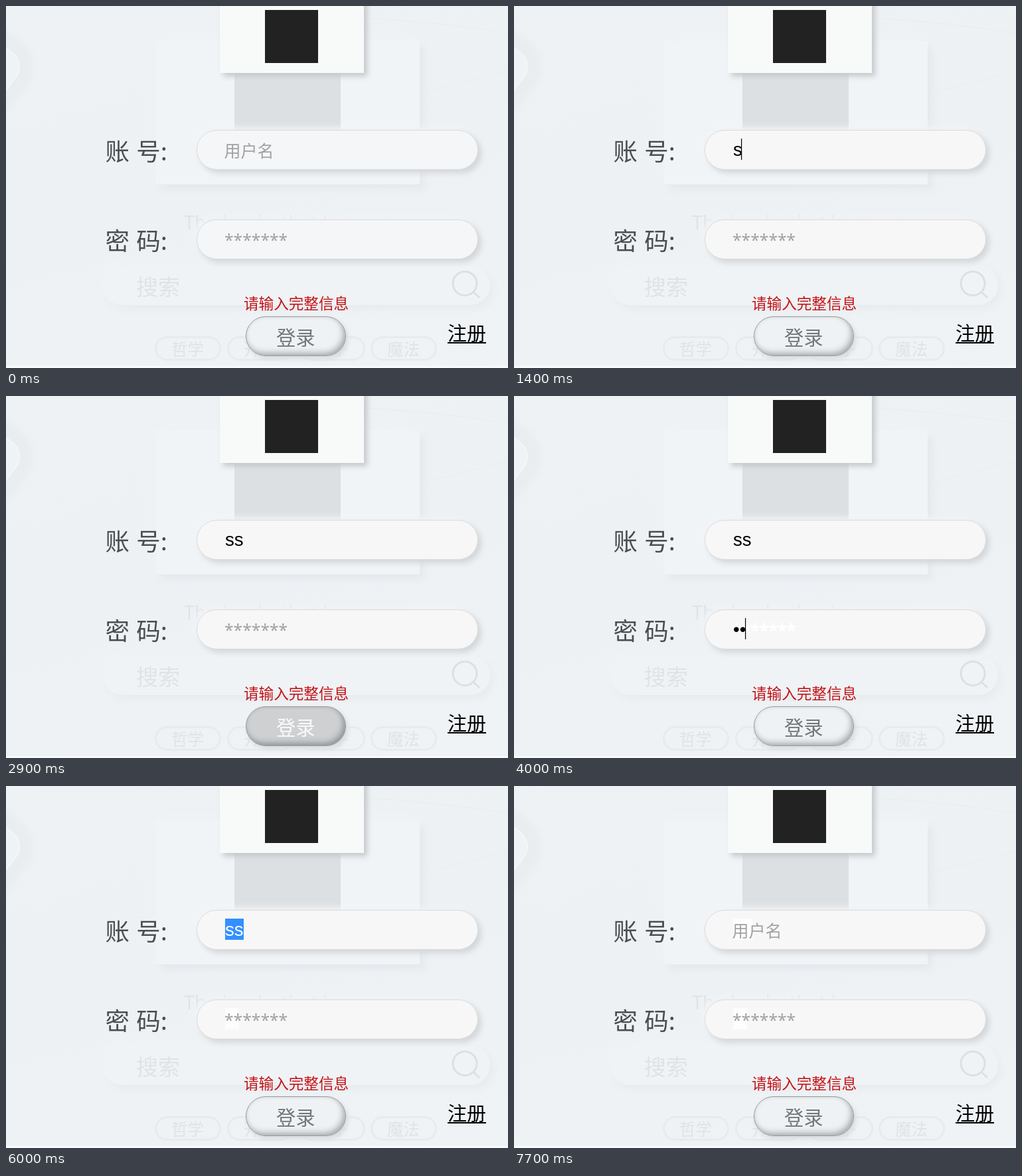
Animation, 756 px wide and 546 px high, one loop 8000 ms. Source, as an HTML page:

```html
<!DOCTYPE html>
<html lang="zh-CN">
<head>
<meta charset="utf-8">
<title>登录</title>
<style>
  html, body { margin: 0; width: 100%; height: 100%; overflow: hidden; background: #eef2f5; }
  #stage { position: relative; width: 756px; height: 546px; overflow: hidden;
    background: linear-gradient(165deg, #eef2f4 0%, #edf1f4 45%, #f0f3f6 100%); }
  #stage div, #stage svg { position: absolute; box-sizing: border-box; }
  svg { left: 0; top: 0; overflow: hidden; }
  text { font-family: "Noto Sans CJK SC", "Noto Sans CJK", sans-serif; white-space: pre; }
  .star { font: 24.7px "Noto Sans", sans-serif; }
  .typed { font: 27.6px "Liberation Sans", sans-serif; }
  .bgcard { left: 226px; top: 53px; width: 397px; height: 216px; background: #f1f4f6;
    box-shadow: 7px 8px 11px #e5e9ec, -4px -4px 10px #f0f3f5; }
  .search { left: 145px; top: 391px; width: 584px; height: 60px; border-radius: 30px;
    background: #f0f3f5; box-shadow: 5px 6px 12px #e7ebee, -4px -4px 9px #f0f3f5; }
  .tag { top: 498px; width: 100px; height: 37px; border: 3px solid #e7ebee; border-radius: 19px; }
  .corner { left: -112px; top: 37px; width: 120px; height: 120px; border-radius: 28px;
    transform: rotate(38deg); background: #eff3f5; border: 2px solid #f4f6f8;
    box-shadow: 0 0 9px 20px #e9edf0; }
  .logo { left: 322px; top: -20px; width: 217px; height: 121px; background: #f8f9f9;
    box-shadow: 5px 5px 8px #c6c9cb; }
  .field { left: 287px; width: 424px; height: 60px; border-radius: 30px; border: 1px solid #dcdcdd;
    box-shadow: 5px 5px 8px #d3d6d9, -4px -4px 9px #f2f4f6; }
  #button { left: 361px; top: 468px; width: 151px; height: 60px; border-radius: 30px;
    border: 1px solid #97999b;
    box-shadow: inset 0 0 6px rgba(0, 0, 0, .08), inset -4px -5px 10px -1px rgba(0, 0, 0, .27),
      3px 4px 7px #d8dbde; }
  #drop { left: 287px; top: 246px; width: 425px; height: 111px; border-radius: 5px;
    background: #292a2d; box-shadow: 0 1px 4px rgba(0, 0, 0, .45); }
  #drop text { font: 16.5px "Open Sans", "Noto Sans CJK SC", "Noto Sans CJK", sans-serif; fill: #fff; }
</style>
</head>
<body>
<div id="stage">
  <div class="corner"></div>
  <div class="bgcard"></div>
  <div class="search"></div>
  <div class="tag" style="left:224px"></div>
  <div class="tag" style="left:333px"></div>
  <div class="tag" style="left:441px"></div>
  <div class="tag" style="left:549px"></div>
  <svg width="756" height="546" fill="#dfe3e6">
    <path d="M539 18Q650 24 756 41M623 132L756 98" fill="none" stroke="#e9edf0"/>
    <rect x="344" y="80" width="160" height="160" fill="#dde0e3"/>
    <text x="268" y="337" font-size="29" style="font-family:'Open Sans',sans-serif">The books that know you</text>
    <text x="196" y="436" font-size="33">搜索</text>
    <g fill="none" stroke="#dce0e3" stroke-width="3">
      <circle cx="691" cy="418.5" r="18"/>
      <path d="M703.5 431L713 440"/>
    </g>
    <g font-size="24.5">
      <text x="249" y="527">哲学</text>
      <text x="358" y="527">开发</text>
      <text x="466" y="527">亲子</text>
      <text x="574" y="527">魔法</text>
    </g>
    <rect y="543" width="756" height="3" fill="#f9fafb"/>
  </svg>
  <div class="logo"></div>
  <div class="field" style="top:187px"></div>
  <div class="field" style="top:322px"></div>
  <div id="button"></div>
  <svg width="756" height="546">
    <rect x="390" y="6" width="80" height="80" fill="#222"/>
    <g font-size="36.5" fill="#4c4d51" word-spacing="2">
      <text x="149.5" y="233">账 号:</text>
      <text x="149.5" y="368">密 码:</text>
    </g>
    <text x="358" y="456.5" font-size="22.6" fill="#c31216">请输入完整信息</text>
    <text id="label" x="407" y="510.5" font-size="29.3">登录</text>
    <text x="665" y="505" font-size="29">注册</text>
    <rect x="665" y="507" width="58" height="2"/>
    <g id="user">
      <text class="hint" x="328.5" y="228" font-size="25">用户名</text>
    </g>
    <g id="pass">
      <text class="hint star" x="329" y="361.5">*******</text>
    </g>
  </svg>
  <div id="drop">
    <svg width="425" height="111">
      <text x="15" y="38">bedo</text>
      <text x="15" y="83" style="font-size:16px">用户名</text>
    </svg>
  </div>
</div>
<script>
const LOOP = 8000;
const $ = id => document.getElementById(id);
const fields = document.querySelectorAll('.field');

// Step tables: [start ms, value]
const dropSteps = [[0, 0], [600, .55], [700, 1], [1200, .6], [1300, .2], [1400, 0]];
const hoverSteps = [[0, 0], [2400, .3], [2500, .75], [2600, 1], [2800, .99], [2900, .96], [3000, .4], [3100, 0],
  [6900, .3], [7000, .75], [7100, 1], [7500, .8], [7600, .35], [7700, 0]];
const tintSteps = [[0, '#f5f6f8'], [1200, '#f7f7f7']];

// Input states: text, caret x, hint colour, selection, pale patch width
const GREY = '#a0a1a3', WHITE = '#fff';
const userSteps = [
  [0, { hint: GREY }],
  [600, { hint: WHITE, caret: 330 }],
  [1200, { text: 's' }],
  [1400, { text: 's', caret: 342 }],
  [1600, { text: 'ss', caret: 357.5 }],
  [1900, { text: 'ss' }],
  [5700, { text: 'ss', caret: 357.5 }],
  [6000, { text: 'ss', select: 28 }],
  [6200, { caret: 330, patch: 29 }],
  [6700, { patch: 29 }],
  [6900, { hint: GREY, patch: 29 }]
];
const passSteps = [
  [0, { hint: GREY }],
  [3500, { hint: WHITE, caret: 330 }],
  [3800, { hint: WHITE, text: '•', caret: 339 }],
  [4000, { hint: WHITE, text: '••', caret: 348 }],
  [4500, { hint: WHITE, text: '••' }],
  [5000, { hint: WHITE, text: '••', select: 20, patch: 21 }],
  [5500, { hint: WHITE, caret: 330, patch: 21 }],
  [5700, { hint: GREY, patch: 21 }]
];

const at = (steps, t) => steps.findLast(s => s[0] <= t)[1];
const mix = (a, b, k) => `rgb(${a.map((v, i) => Math.round(v + (b[i] - v) * k))})`;

function add(parent, tag, attrs, before) {
  const el = document.createElementNS('http://www.w3.org/2000/svg', tag);
  for (const k in attrs) el.setAttribute(k, attrs[k]);
  parent.insertBefore(el, before || null);
  return el;
}

function input(id, top, baseline) {
  const g = $(id), hint = g.querySelector('.hint');
  const box = (fill, before) => add(g, 'rect', { x: 330, y: top, height: 32, width: 0, fill }, before);
  const patch = box('#fdfdfd', hint), select = box('#3390ff');
  const text = add(g, 'text', { class: 'typed', x: 330, y: baseline });
  const caret = box('#000');
  return s => {
    hint.style.fill = s.hint || 'none';
    hint.style.stroke = s.hint === WHITE ? WHITE : 'none';
    patch.setAttribute('width', s.patch || 0);
    select.setAttribute('width', s.select || 0);
    text.textContent = s.text || '';
    text.style.fill = s.select ? '#fff' : '#000';
    caret.setAttribute('x', s.caret || 0);
    caret.setAttribute('width', s.caret ? 1.2 : 0);
  };
}

const drawUser = input('user', 200, 226);
const drawPass = input('pass', 335, 360.5);

function frame() {
  const t = performance.now() % LOOP;
  const hover = at(hoverSteps, t);
  drawUser(at(userSteps, t));
  drawPass(at(passSteps, t));
  fields.forEach(f => f.style.background = at(tintSteps, t));
  $('drop').style.opacity = at(dropSteps, t);
  $('button').style.background = mix([239, 242, 244], [206, 207, 209], hover);
  $('label').style.fill = mix([117, 118, 122], [255, 255, 255], hover);
  requestAnimationFrame(frame);
}
frame();
</script>
</body>
</html>
```
